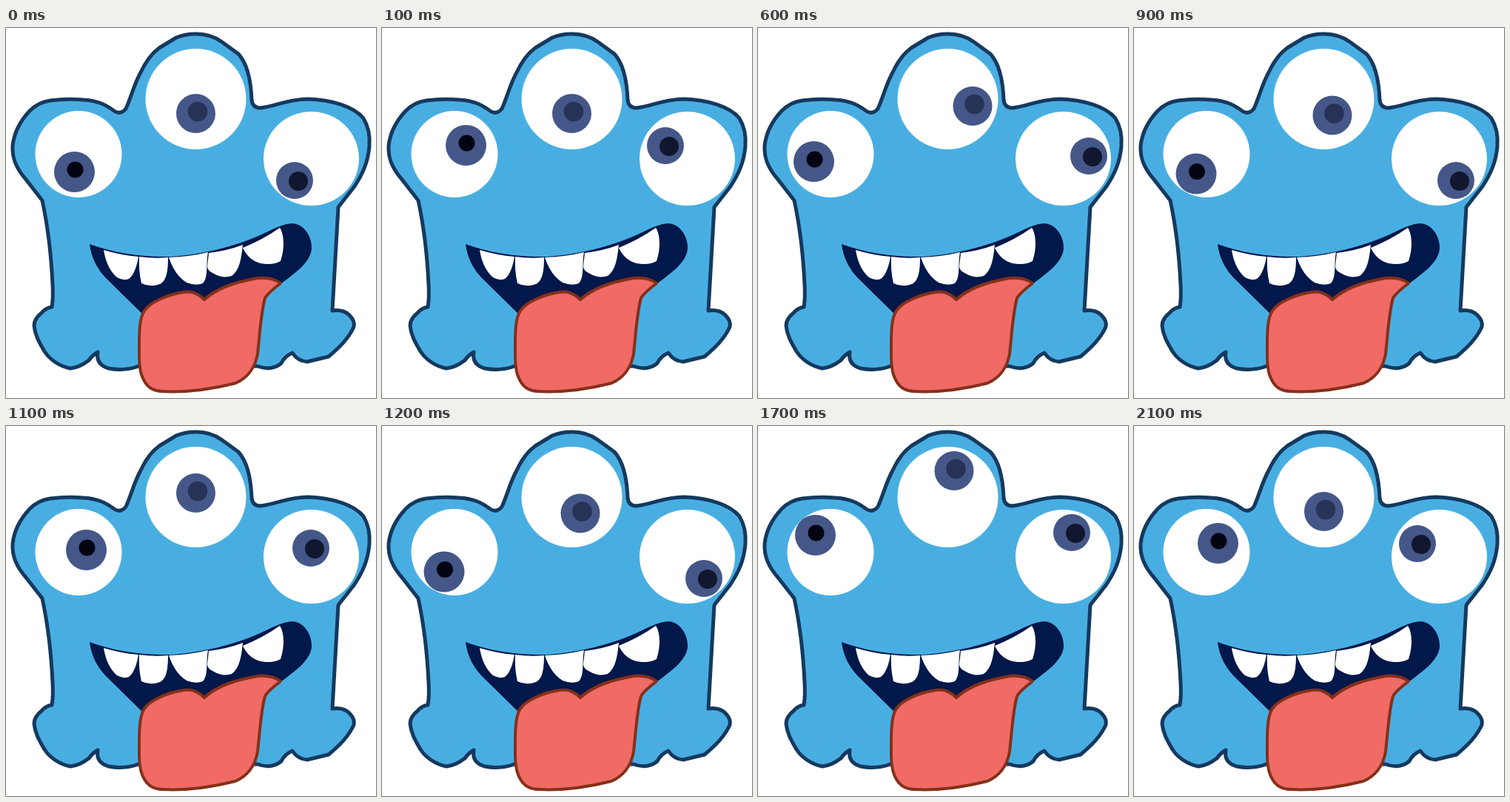
Animation of 500 by 500 pixels, one loop 2.2 s. Source, as an HTML page:

```html
<!DOCTYPE html>
<html lang="en">
<head>
<meta charset="utf-8">
<title>Three-eyed monster</title>
<style>
html, body { margin: 0; width: 100%; height: 100%; overflow: hidden; background: #fff; }
svg { display: block; width: 100vw; height: 100vh; }
</style>
</head>
<body>
<svg viewBox="0 0 500 500">
  <path fill="#48aee2" stroke="#15395f" stroke-width="5" stroke-linejoin="round" d="M257 8
    C273 8 284 13 292 19 L314 35 C326 48 331 72 332 97 Q333 108 344 108
    C366 105 382 96 408 96 C440 97 470 106 483 122 C491 135 492 147 491 160
    C489 182 482 197 471 214 L449 242 L441 382 Q456 380 464 388 Q472 396 470 404
    C462 421 450 432 436 444 L407 451 Q394 450 387 439 Q377 443 372 453
    Q359 464 340 457 L179 457 Q160 464 139 460 Q121 455 124 438
    Q117 442 112 449 Q99 459 87 460 C72 457 59 448 52 437 C45 425 39 415 38 402
    Q38 393 48 385 Q54 378 62 377 Q64 365 63 347 C61 305 57 270 49 233
    L28 206 C14 190 8 176 9 159 C11 140 19 126 32 112 Q44 100 60 98
    Q82 95 104 97 C123 98 134 103 146 112 Q155 118 162 109
    C169 94 173 76 182 60 C189 45 196 35 207 27 L230 13 Q242 8 257 8Z"/>
  <path fill="#02174a" d="M113 292 C150 305 185 310 224 309 C265 306 310 295 341 281
    C359 273 374 264 388 264 C404 266 414 283 413 299 C411 317 391 331 371 346
    L270 390 H188 L135 338 Q116 318 113 292Z"/>
  <g fill="#fff">
    <path d="M132 300 Q155 307 179 309 C177 321 173 334 166 339 Q159 342 150 337 Q136 325 132 300Z"/>
    <path d="M180 309 Q200 312 219 310 C219 328 217 342 208 346 Q195 351 183 345 Q179 328 180 309Z"/>
    <path d="M220 310 Q248 309 273 303 C270 317 274 337 266 345 Q257 349 244 344 Q228 334 220 310Z"/>
    <path d="M274 304 Q299 301 320 293 C318 311 316 327 305 335 Q293 339 281 332 Q272 328 272 322Z"/>
    <path d="M320 297 Q347 286 370 270 C376 279 377 298 371 315 Q361 321 344 318 Q328 314 320 297Z"/>
  </g>
  <path fill="#f06a66" stroke="#85301a" stroke-width="4" stroke-linejoin="round" d="M268 367
    Q255 354 240 357 C218 360 194 371 187 382 C179 393 180 420 180 445
    C180 473 190 491 211 491 C246 493 282 487 310 480 C326 473 337 459 340 440
    C343 414 344 388 350 365 Q354 358 371 345 Q360 336 340 338 C312 343 287 350 268 367Z"/>
  <g fill="#fff">
    <circle cx="98" cy="170.5" r="58.5"/>
    <circle cx="256.5" cy="96" r="68"/>
    <ellipse cx="412.5" cy="176.5" rx="64.5" ry="63.5"/>
  </g>
  <g class="iris"><circle r="27.5" fill="#455788"/><circle cx="1" cy="-3" r="11" fill="#020511"/></g>
  <g class="iris"><circle r="26.5" fill="#455788"/><circle cx="2.5" cy="-2.5" r="13.3" fill="#263356"/></g>
  <g class="iris"><circle r="25" fill="#455788"/><circle cx="5" cy="1" r="13" fill="#10172f"/></g>
</svg>
<script>
// Each pose places the left, middle and right iris.
const low = [[92.5, 194.5], [256.5, 115.5], [390, 206]];
const inward = [[113.5, 158.5], [256.5, 115.5], [383, 159]];
const up = [[77.5, 147.5], [265, 60.5], [424, 144]];
const side = [[75.5, 180.5], [290, 105.5], [447, 173]];
const lowSide = [[84, 197], [268, 118], [435, 206]];
const centre = [[108.5, 167.5], [256.5, 90.5], [412, 165]];

const steps = [
  [0, low], [100, inward], [200, up], [600, side], [900, lowSide],
  [1100, centre], [1200, lowSide], [1400, side], [1700, up], [2100, inward]
];
const irises = document.querySelectorAll(".iris");

function draw(now) {
  const time = now % 2200;
  const [, pose] = steps.findLast(([start]) => start <= time);
  irises.forEach((iris, i) => iris.setAttribute("transform", `translate(${pose[i]})`));
  requestAnimationFrame(draw);
}
draw(performance.now());
</script>
</body>
</html>
```
